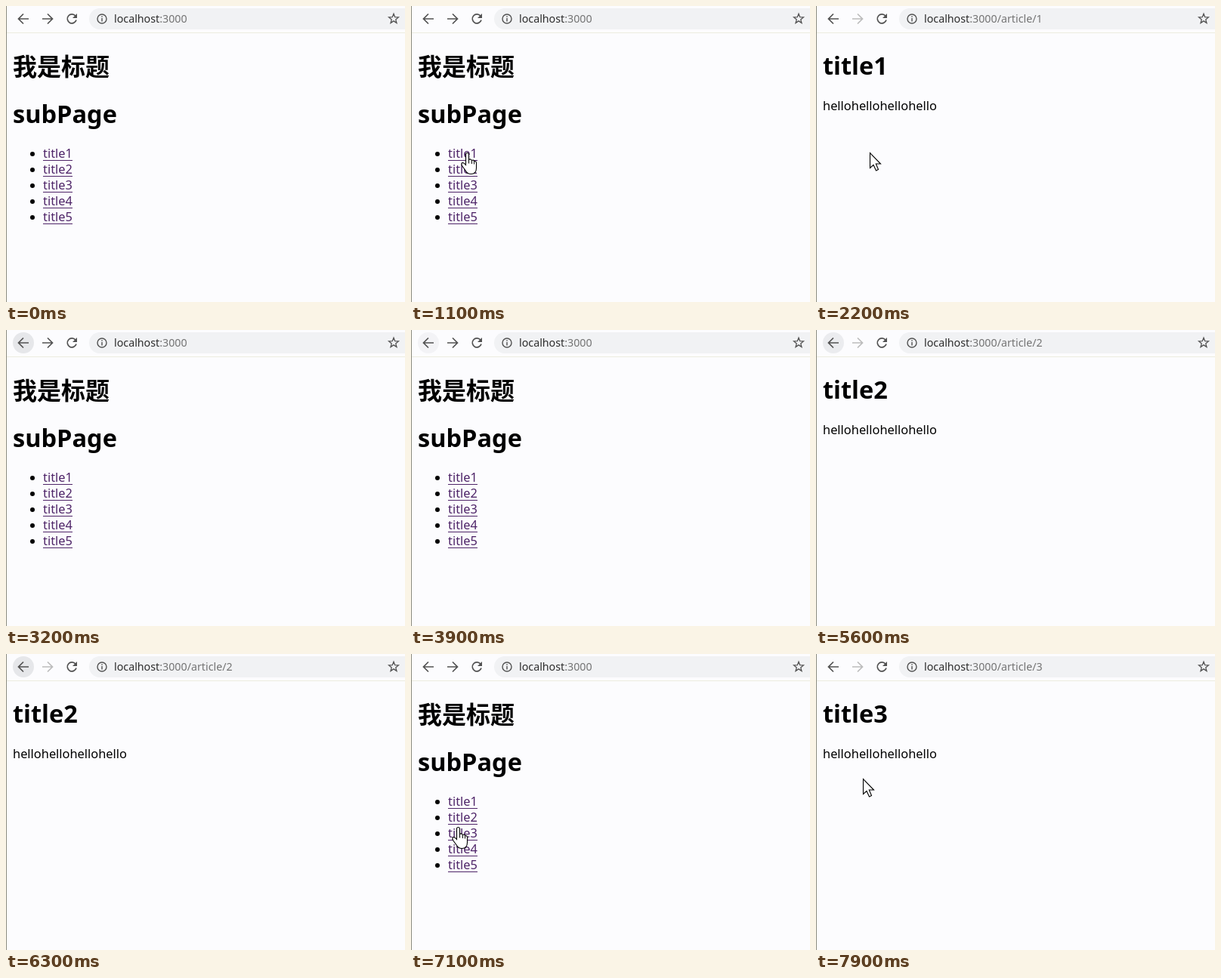
These frames come from a looping animation (528 px wide and 392 px high, 8 s). An HTML page with a canvas:

```html
<!DOCTYPE html>
<html lang="zh">
<head>
<meta charset="utf-8">
<title>subPage</title>
<style>
html, body { margin: 0; width: 528px; height: 392px; overflow: hidden; background: #fcfcfe; }
canvas { display: block; }
</style>
</head>
<body>
<canvas id="stage" width="528" height="392"></canvas>
<script>
const ctx = document.getElementById('stage').getContext('2d');
const LOOP = 8000, STEP = 100;
const SANS = '"Noto Sans", "Open Sans", sans-serif';
const CJK = '"Noto Sans CJK SC", "Noto Sans CJK", sans-serif';
const INK = '#525252', DIM = '#bcbcbc', PILL = '#f1f2f4', LINK = '#4e2468';

// [time, article shown]; 0 is the list page
const pages = [[0, 0], [1400, 1], [3200, 0], [4700, 2], [6500, 0], [7400, 3]];
// [time, x, y] of the pointer tip
const route = [
  [500, 58, -10], [1000, 71, 194], [2400, 71, 194], [2900, 23, 17],
  [3850, 23, 17], [4350, 60, 215], [5100, 60, 215], [5600, 23, 17],
  [6700, 23, 17], [7150, 60, 237], [7500, 60, 237], [7900, 62, 165]
];
const hovers = [[2750, 4000], [5450, 6850]];

const clamp = v => Math.max(0, Math.min(1, v));
const ease = v => v * v * (3 - 2 * v);

function pointerAt(t) {
  let a = route[0];
  for (const b of route) {
    if (t < b[0]) {
      const k = ease(clamp((t - a[0]) / (b[0] - a[0] || 1)));
      return [a[1] + (b[1] - a[1]) * k, a[2] + (b[2] - a[2]) * k];
    }
    a = b;
  }
  return [a[1], a[2]];
}

function text(str, x, y, font, color = '#000') {
  ctx.font = font;
  ctx.fillStyle = color;
  ctx.fillText(str, x, y);
  return ctx.measureText(str).width;
}

function disc(x, y, r, color) {
  ctx.fillStyle = color;
  ctx.beginPath();
  ctx.arc(x, y, r, 0, Math.PI * 2);
  ctx.fill();
}

function stroke(path, color, width) {
  ctx.strokeStyle = color;
  ctx.lineWidth = width;
  ctx.stroke(new Path2D(path));
}

function star(x, y, r) {
  ctx.beginPath();
  for (let i = 0; i < 10; i++) {
    const a = -Math.PI / 2 + i * Math.PI / 5, d = i % 2 ? r * 0.43 : r;
    ctx.lineTo(x + d * Math.cos(a), y + d * Math.sin(a));
  }
  ctx.closePath();
  ctx.strokeStyle = INK;
  ctx.lineWidth = 1.3;
  ctx.stroke();
}

function toolbar(t, article) {
  for (const [from, to] of hovers) {
    ctx.globalAlpha = clamp(Math.min((t - from) / 200, (to - t) / 250));
    disc(23, 17, 14, '#e6e7ea');
  }
  ctx.globalAlpha = 1;
  stroke('M30 17H17M23 10.5L16.5 17L23 23.5', INK, 1.7);
  stroke('M48 17H61M55 10.5L61.5 17L55 23.5', article ? DIM : INK, 1.7);
  stroke('M92 13.2A6 6 0 1 0 93 18.5', INK, 1.7);
  ctx.fillStyle = INK;
  ctx.fill(new Path2D('M94 10V16H88Z'));

  ctx.fillStyle = PILL;
  ctx.beginPath();
  ctx.roundRect(110, 3, 440, 28, 14);
  ctx.fill();
  stroke('M133 17A6 6 0 1 1 121 17A6 6 0 1 1 133 17M127 16V20.5M127 13.2V14.8', INK, 1.4);
  const font = '14.25px ' + SANS;
  const w = text('localhost', 143, 22, font, '#2c2c2c');
  text(':3000' + (article ? '/article/' + article : ''), 143 + w, 22, font, '#747474');
  star(513, 17, 6.7);

  ctx.fillStyle = '#ececdf';
  ctx.fillRect(0, 35, 528, 1);
}

function listPage() {
  text('我是标题', 9, 92, 'bold 32px ' + CJK);
  text('subPage', 9, 155, 'bold 32.5px ' + SANS);
  for (let i = 0; i < 5; i++) {
    const y = 201 + i * 21;
    disc(35, y - 5, 3, '#000');
    const w = text('title' + (i + 1), 49, y, '16.4px ' + SANS, LINK);
    ctx.fillRect(49, y + 3, Math.round(w), 1);
  }
}

function articlePage(n) {
  text('title' + n, 9, 91, 'bold 32.5px ' + SANS);
  text('hello'.repeat(4), 9, 138, '16.4px ' + SANS);
}

function shape(x, y, path, detail) {
  ctx.save();
  ctx.translate(Math.round(x) + 0.5, Math.round(y) + 0.5);
  const p = new Path2D(path);
  ctx.fillStyle = '#fff';
  ctx.fill(p);
  ctx.strokeStyle = '#000';
  ctx.lineWidth = 1.1;
  ctx.stroke(p);
  if (detail) stroke(detail, '#000', 1);
  ctx.restore();
}

function pointer(x, y, article) {
  const onLink = !article && x >= 49 && x <= 88 && y >= 185 && y < 290;
  if (onLink) {
    shape(x, y,
      'M1 16V2Q1 0 3 0Q5 0 5 2V9Q7 7.5 9 10Q11 8.5 12 11Q15 10.5 15 14V20Q15 28 8 28Q3 28 1 24' +
      'L-4 17Q-5.5 14 -3.5 13Q-2 12.5 1 16Z',
      'M5 9V14M9 10V14.5M12 11V15');
  } else {
    shape(x, y, 'M0 0V20L4.5 16L8 23.5L11 22L7.8 14.5H14Z');
  }
}

function draw(now) {
  const t = Math.floor((now % LOOP) / STEP) * STEP;
  const article = pages.filter(p => p[0] <= t).pop()[1];
  ctx.fillStyle = '#fcfcfe';
  ctx.fillRect(0, 0, 528, 392);
  toolbar(t, article);
  if (article) articlePage(article);
  else listPage();
  ctx.fillStyle = '#8c8c80';
  ctx.fillRect(0, 0, 1, 392);
  const [x, y] = pointerAt(t);
  if (y > 36) pointer(x, y, article);
}

let start;
function frame(now) {
  if (start === undefined) start = now;
  draw(Math.max(0, now - start));
  requestAnimationFrame(frame);
}
draw(0);
requestAnimationFrame(frame);
</script>
</body>
</html>
```
